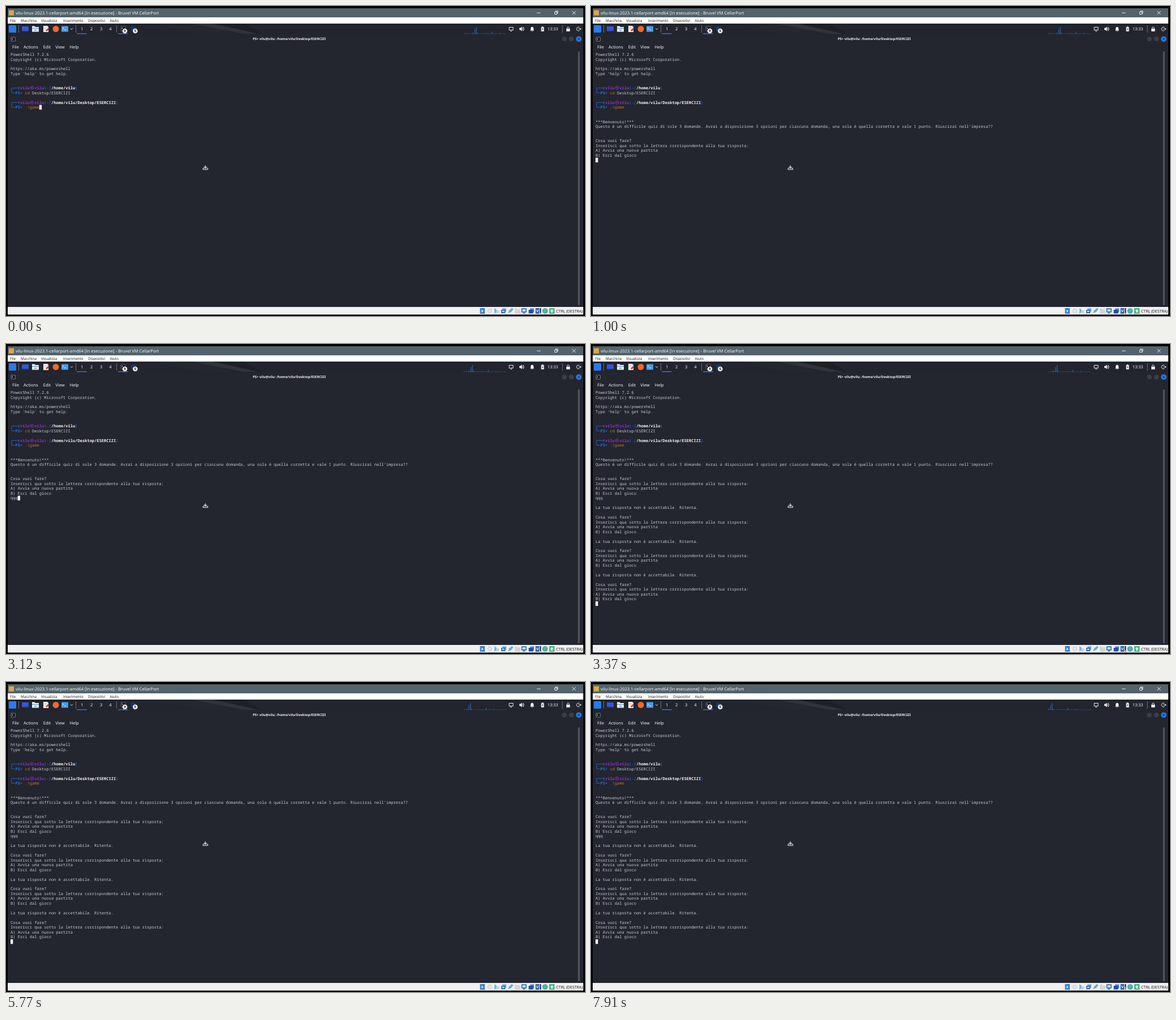
Write an HTML page that moves like this. It is 1023x547 px and loops after 7.99 s.

```html
<!DOCTYPE html>
<html lang="it">
<head>
<meta charset="utf-8">
<title>Terminal quiz</title>
<style>
html, body { margin: 0; width: 100%; height: 100%; overflow: hidden; background: #000; }
svg { display: block; width: 1023px; height: 547px; }
text { white-space: pre; text-rendering: geometricPrecision; }
.mono { font: 7.06px "Noto Sans Mono", "DejaVu Sans Mono", monospace; font-variant-ligatures: none; fill: #c9ccd1; }
.bold { font-weight: 700; }
.win { font-family: "Open Sans", "Noto Sans", sans-serif; }
.desk { font-family: "Noto Sans", "Open Sans", sans-serif; fill: #f2f3f5; }
.line { fill: none; stroke: #eceef0; stroke-width: 1; }
</style>
</head>
<body>
<svg id="stage" viewBox="0 0 1023 547"></svg>
<script>
const LOOP = 7990, LEFT = 8, TOP = 85.5, COL = 4.235, ROW = 8.466;
const BLUE = '#2670e0', PURPLE = '#9430c8', ORANGE = '#c47628';
const USER = 'vilu', HOME = '/home/' + USER;

const rect = (x, y, w, h, fill, more = '') =>
  `<rect x="${x}" y="${y}" width="${w}" height="${h}" fill="${fill}" ${more}/>`;
const circle = (x, y, r, fill) => `<circle cx="${x}" cy="${y}" r="${r}" fill="${fill}"/>`;
const line = (d, more = '') => `<path class="line" d="${d}" ${more}/>`;
const fill = (d, color) => `<path d="${d}" fill="${color}"/>`;
const label = (x, y, size, str, cls, more = '') =>
  `<text x="${x}" y="${y}" font-size="${size}" class="${cls}" ${more}>${str.replace(/>/g, '&gt;')}</text>`;
const mono = (row, col, str, color, bold) =>
  label(LEFT + col * COL, TOP + 2.6 + row * ROW, 7.06, str, bold ? 'mono bold' : 'mono',
    color ? `style="fill:${color}"` : '');
const lines = (row, list) => list.map((s, i) => s && mono(row + i, 0, s)).join('');

function hostWindow() {
  const menu = [[7, 'File'], [26, 'Macchina'], [62, 'Visualizza'], [101, 'Inserimento'], [145, 'Dispositivi'], [183.5, 'Aiuto']];
  return rect(3, 4, 1017, 16, '#52636b') + rect(5, 7.5, 9, 9, '#d9a650') +
    label(17, 14.7, 7.5, `${USER}-linux-2023.1-cellarport-amd64 [In esecuzione] - Bruvel VM CellarPort`, 'win', 'fill="#fff"') +
    line('M938 12.2h6.5M1000.5 9l6 6m0-6l-6 6') +
    line('M969.5 10.5h4v4h-4zM971 10v-1.2h4v4h-1.2', 'stroke-width=".8"') +
    rect(3, 20, 1017, 11, '#fff') +
    menu.map(([x, s]) => label(x, 27.8, 6.3, s, 'win', 'fill="#111"')).join('');
}

function panel() {
  const seps = [22.5, 123.5, 195.5, 983].map(x => rect(x - .4, 34, .9, 13, '#777b84')).join('');
  const desks = [131.9, 148.9, 165.9, 182.3].map((x, i) => label(x, 42.8, 7.4, String(i + 1), 'desk')).join('');
  const badge = (x, n) => circle(x, 44, 4.3, '#f4f4f4') +
    label(x, 46.3, 6.2, n, 'win bold', 'fill="#222" text-anchor="middle"');
  return rect(3, 31, 1017, 19, '#22252d') +
    fill('M270 31H365L395 49H338z', '#24272e') + fill('M328 31H400L446 49H420z', '#30333a') +
    fill('M365 31H420L450 47 446 49z', '#1d2026') +
    rect(5, 34, 13, 13, '#2c7be8', 'rx="1.5"') +
    rect(28, 36, 12, 9, '#3657d5', 'rx=".8"') + rect(28, 43.5, 12, 1.5, '#26389a') +
    fill('M46 35.5h4.5l1.3 1.5H58v8.5H46z', '#e9eef4') + rect(46, 39, 12, 1, '#4e8de0') + rect(50, 42, 4, 1.2, '#5a7ea8') +
    fill('M66 35h7l2 2v9h-9z', '#f2f2f2') + fill('M70 43l4-4 2 2-4 4z', '#d9342b') + line('M67.5 38h4m-4 2h3', 'stroke="#999" style="stroke:#999;stroke-width:.6"') +
    circle(88, 40.5, 5.5, '#ee6a2c') +
    rect(98, 35.5, 12, 10, '#4a9ae8', 'rx=".8"') + line('M100 38l2 1.6-2 1.6M103 42h3', 'stroke-width=".8"') +
    line('M114 39.5l2 2 2-2') + seps + desks +
    rect(125, 48, 17.5, 1.6, '#2a6fd4') + rect(198, 48, 17.5, 1.6, '#2a6fd4') +
    rect(203, 36, 8, 8, '#15171c', 'rx="1" stroke="#9da1a8" stroke-width=".5"') + line('M204.5 38l1.6 1.3-1.6 1.3') + badge(210, '9') +
    rect(221, 36.5, 8.5, 7.5, '#17396f') + badge(228.3, '5') +
    line('M889 37.5h7v5h-7zM891 44.4h3') +
    fill('M907 38.8h2l2.5-2.3v8l-2.5-2.3h-2z', '#f2f3f5') + line('M912.5 38.5q1.7 2 0 4M913.8 37q3 3.5 0 7', 'stroke-width=".9"') +
    fill('M926 43.5l1-1.3v-2.7q.3-2.5 2.6-2.8 2.4.3 2.6 2.8v2.7l1 1.3zM928.6 44.2h2l-1 1.2z', '#f2f3f5') +
    fill('M945.5 37.3h1.3v-1h2.4v1h1.3v7.4h-5z', '#f2f3f5') + fill('M948.4 38.5l-1.7 2.8h1.2l-.5 2.3 1.9-3h-1.3z', '#22252d') +
    label(956.8, 42.9, 7.25, '13:33', 'desk') +
    rect(990, 40, 6.4, 4.8, '#f2f3f5', 'rx=".6"') + line('M991.4 40v-1.2a1.8 1.8 0 0 1 3.6 0V40') +
    line('M1013.5 38a3.3 3.3 0 1 0 0 5M1011.5 40.5h4.5m-1.5-1.5l1.5 1.5-1.5 1.5');
}

function terminal() {
  const menu = [[11, 'File'], [31, 'Actions'], [65.8, 'Edit'], [87.3, 'View'], [112.4, 'Help']];
  return rect(3, 50, 1017, 481, '#23252f') +
    rect(9, 55, 7.5, 7, '#181a20', 'stroke="#a2a5ab" stroke-width=".7" rx=".8"') + line('M10.5 57l1.4 1.2-1.4 1.2', 'stroke-width=".7"') +
    label(500.5, 60.2, 5.9, `PS> ${USER}@${USER}: ${HOME}/Desktop/ESERCIZI`, 'desk bold', 'text-anchor="middle"') +
    circle(986.5, 58.3, 4.3, '#3b3e47') + circle(999, 58.3, 4.3, '#3b3e47') + circle(1012, 58.3, 4.9, '#2b76e5') +
    line('M1010.2 56.5l3.6 3.6m0-3.6l-3.6 3.6', 'style="stroke:#14213a"') +
    menu.map(([x, s]) => label(x, 75, 7.5, s, 'desk', 'font-weight="500"')).join('') +
    rect(1010.6, 80, 3.2, 448, '#52545c', 'rx="1.5"') +
    lines(0, ['PowerShell 7.2.6', 'Copyright (c) Microsoft Corporation.', '', 'https://aka.ms/powershell', "Type 'help' to get help."]) +
    prompt(7, HOME) + mono(8, 6, 'cd', ORANGE) + mono(8, 9, 'Desktop/ESERCIZI') +
    prompt(10, HOME + '/Desktop/ESERCIZI') + mono(11, 6, '.\\game', ORANGE);
}

function prompt(row, path) {
  const y = TOP + row * ROW;
  return `<path d="M24 ${y}H10V${y + ROW}H16" fill="none" stroke="${BLUE}" stroke-width=".8"/>` +
    mono(row, 3, '(', BLUE) + mono(row, 4, USER, PURPLE, true) +
    label(LEFT + 9 * COL, y + 2.6, 7.06, '㉿', 'bold', `fill="${PURPLE}" text-anchor="middle" font-family="Noto Sans CJK KR, Noto Sans CJK JP, sans-serif"`) +
    mono(row, 10, USER, PURPLE, true) + mono(row, 14, ')-[', BLUE) +
    mono(row, 17, path, '#f4f5f7', true) + mono(row, 17 + path.length, ']', BLUE) +
    mono(row + 1, 2, 'PS>', BLUE, true);
}

function statusBar() {
  const x = i => 837.5 + i * 12.2;
  const screen = (i, color) => rect(x(i), 533.5, 9, 7, color) + rect(x(i) + 1.5, 535, 6, 4, '#bfe0ff') + rect(x(i) + 2.5, 541, 4, 1.5, color);
  return rect(3, 531, 1017, 13.5, '#f0f0f0') +
    rect(x(0), 533, 8.5, 10, '#3a83cf') + fill('M840.5 536l3 2-3 3z', '#fff') +
    circle(x(1) + 5, 538, 4.6, '#d9dcdf') + circle(x(1) + 5, 538, 1.3, '#f6f6f6') +
    fill('M863 533l6 5-6 5z', '#6fb4df') + rect(866, 537, 5, 5, '#b7d7ea') +
    rect(877, 533.5, 7, 6, '#6aa9e6') + rect(875, 536, 7, 6, '#2159a8') + rect(876.3, 537.3, 4.4, 3, '#a9d0f5') +
    fill('M887 542l2-5 5-4 2.5 2-4 5z', '#69a9d6') +
    fill('M899 534h4l1 1.3h5V543h-10z', '#d3d5d8') +
    screen(6, '#1f5fb5') +
    rect(926, 533.5, 7, 7, '#4b8bdc') + rect(923.5, 536, 8, 6.5, '#1f4fa3') +
    rect(935.5, 533, 6.5, 10, '#3567b2') + line('M937 536l1.8 4 1.8-4') + rect(943, 533, 2.4, 10, '#243a5e') +
    circle(952.5, 538, 4.8, '#3f9bd0') + fill('M950 534l6 1-2 5-4 2z', '#5ac06a') +
    rect(959.7, 533, 9.6, 10, '#46b884', 'rx="1"') + fill('M964.5 535l3.2 3h-2v3h-2.4v-3h-2z', '#e9fff2') +
    label(972, 540.6, 6.9, 'CTRL (DESTRA)', 'win', 'fill="#111"');
}

const pointer = line('M352.2 281v5.5M349.5 284.2h5.4M348 286.2h8.6v2.4H348z', 'stroke-width=".9"') + rect(349, 287, 6.6, .9, '#111');

// Game output
const menuLines = ['Cosa vuoi fare?', 'Inserisci qua sotto la lettera corrispondente alla tua risposta:', 'A) Avvia una nuova partita', 'B) Esci dal gioco'];
const retry = ['La tua risposta non è accettabile. Ritenta.', '', ...menuLines, ''];
const intro = lines(14, ['***Benvenuto!***',
  "Questo è un difficile quiz di sole 3 domande. Avrai a disposizione 3 opzioni per ciascuna domanda, una sola è quella corretta e vale 1 punto. Riuscirai nell'impresa??",
  '', '', ...menuLines]);
const retries = lines(24, [...retry, ...retry, ...retry]);

// Processor graph, advancing half a pixel at each screen refresh
const ticks = [260, 500, 750, 1000, 1240, 1490, 1820, 2060, 2390, 2470, 2640, 2720, 2880, 3120, 3370, 3870, 4950,
  5030, 5360, 5520, 5770, 6020, 6100, 6270, 6350, 6510, 6750, 7000, 7250, 7420, 7500, 7750, 7910];
const noise = n => { const v = Math.sin(n * 12.9898) * 43758.5453; return v - Math.floor(v); };
const spikes = [[811, 1.6], [814, 1.3], [825, 2], [828.5, 8.5], [831.2, 12.3], [833, 2], [859, 3.8], [873, 1.6]];
let graph = spikes.map(([x, h]) => rect(x - .5, 49.3 - h, 1, h, '#2b72c8')).join('');
for (let i = 0; i < 90; i++) {
  const h = .4 + noise(i + 1) * .8;
  graph += rect(811 + i, 49.3 - h, 1, h, '#24579a');
}

const stage = document.getElementById('stage');
stage.innerHTML = '<defs><clipPath id="graphBox"><path d="M808 36H883V50H808z"/></clipPath></defs>' +
  hostWindow() + panel() + `<g clip-path="url(#graphBox)"><g id="graph">${graph}</g></g>` +
  terminal() + `<g id="intro">${intro}</g><g id="retries">${retries}</g>` +
  `<text id="typed" class="mono" x="${LEFT}" y="${TOP + 2.6 + 22 * ROW}"></text>` +
  rect(0, 0, 4.3, 8.2, '#fff', 'id="cursor"') + statusBar() + rect(943.4, 540, 1.6, 3, '#58c06a', 'id="load"') + pointer;

const el = id => document.getElementById(id);
const show = (id, on) => el(id).setAttribute('visibility', on ? 'visible' : 'hidden');

function draw(now) {
  const t = now % LOOP;
  const step = ticks.filter(x => x <= t).length;
  const started = t >= 500, rejected = t >= 3370;
  const typed = [2470, 2640, 2880].filter(x => x <= t).length;
  const row = rejected ? 44 : started ? 22 : 11;
  const col = rejected ? 0 : started ? typed : 12;
  show('intro', started);
  show('retries', rejected);
  el('typed').textContent = 'q'.repeat(typed);
  el('cursor').setAttribute('x', LEFT + col * COL);
  el('cursor').setAttribute('y', TOP - 4 + row * ROW);
  el('graph').setAttribute('transform', `translate(${-step * .5})`);
  const load = t < 1820 ? 2 : 1 + Math.floor(noise(Math.floor(step / 3)) * 5);
  el('load').setAttribute('y', 543 - load);
  el('load').setAttribute('height', load);
  requestAnimationFrame(draw);
}
requestAnimationFrame(draw);
</script>
</body>
</html>
```
